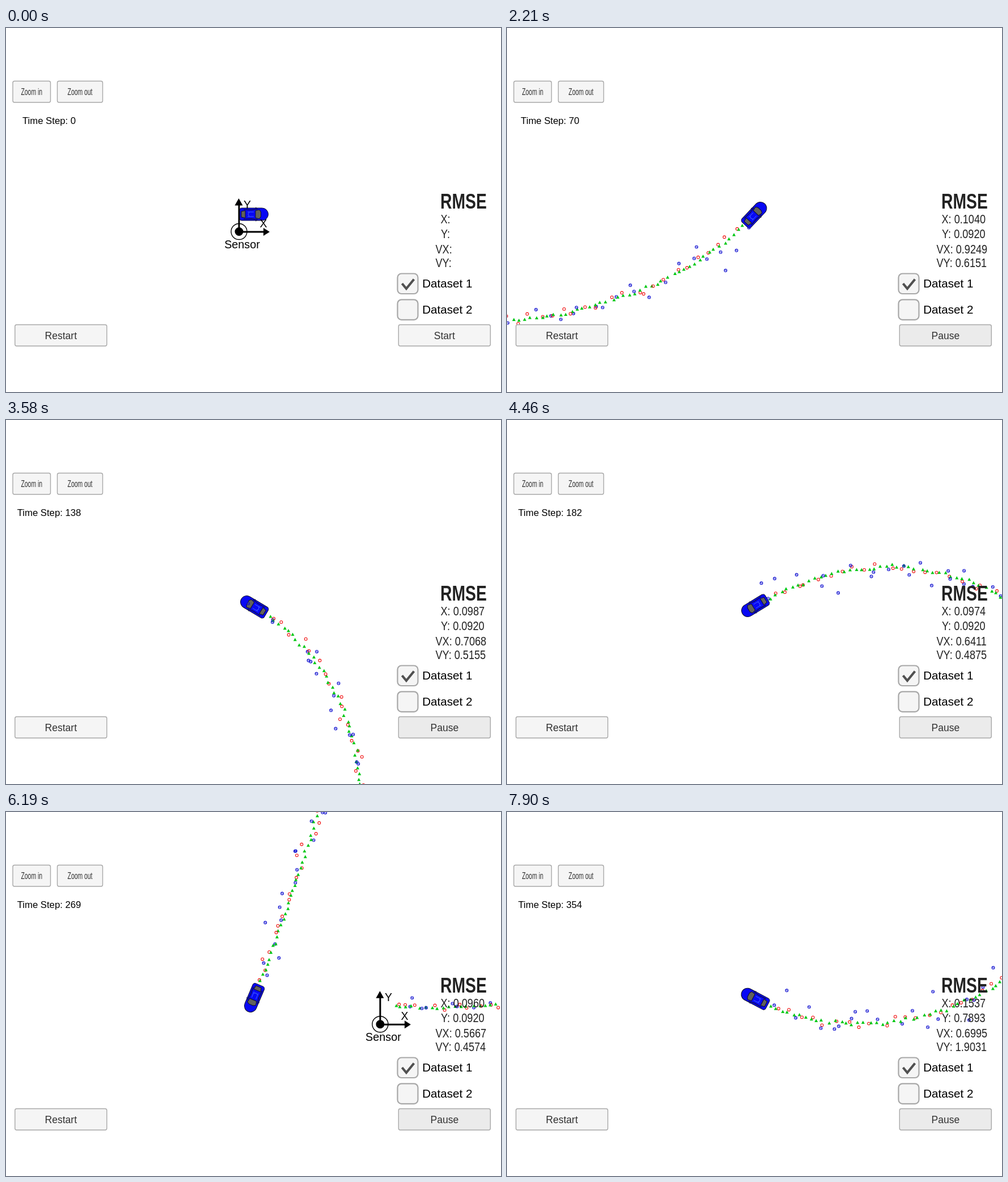
These frames come from a looping animation (873x641 px, 8 s). An HTML page with a canvas:

```html
<!DOCTYPE html>
<html lang="en">
<head>
<meta charset="utf-8">
<title>Tracking simulator</title>
<style>
  html, body { margin: 0; width: 100%; height: 100%; overflow: hidden; background: #fff; }
  canvas { display: block; }
</style>
</head>
<body>
<canvas id="stage" width="873" height="641"></canvas>
<script>
const ctx = document.getElementById('stage').getContext('2d');
const LOOP = 8000, TICK = 171.8, TICK_LEAD = 35, LAST_TICK = 46;
const SPEED = 10.6, LAST_STEP = 360, DIVERGE_STEP = 274;
const CAR = { x: 437, y: 328 };
const SENSOR = { x: -26, y: -30.5 };   // world units are pixels, y up, car starts at 0,0
const INK = '#323232', DARK_INK = '#222';

// Tick -> simulation step
const STEPS = [[4.84, 0], [21, 138], [32, 235], [41, 312], [46, 354]];

// Tick -> pointer tip: to the Start button, then down and away
const POINTER = [[1, 790, 585], [4, 768, 540], [8, 748.5, 594], [9, 748, 620]];

// Error = constant noise + a bad first guess + the later divergence
const ERRORS = [
  { name: 'X', x: 766.5, y: 344, noise: 0.093, start: 0.39, kick: 2.27 },
  { name: 'Y', x: 767, y: 369.5, noise: 0.092, start: 0, kick: 14.75 },
  { name: 'VX', x: 757.5, y: 396.5, noise: 0.365, start: 7.11, kick: 8.69 },
  { name: 'VY', x: 757.5, y: 421.3, noise: 0.387, start: 4, kick: 34.83 }
];

function lookup(rows, key) {
  let i = 1;
  while (i < rows.length - 1 && rows[i][0] < key) i++;
  const [a, b] = [rows[i - 1], rows[i]];
  const u = Math.min(1, Math.max(0, (key - a[0]) / (b[0] - a[0])));
  return a.slice(1).map((v, j) => v + (b[j + 1] - v) * u);
}

let seed = 7;
function random() {
  seed = (seed * 1664525 + 1013904223) % 4294967296;
  return (seed + 1) / 4294967297;
}
const gauss = sd => sd * Math.sqrt(-2 * Math.log(random())) * Math.cos(2 * Math.PI * random());

// The heading swings as a cosine, which makes the course a figure of eight.
const headingAt = step => 126 * Math.PI / 180 * (1 - Math.cos(2 * Math.PI * step / 494));

const path = [{ x: 0, y: 0 }];
for (let i = 0; i < LAST_STEP; i++) {
  const a = headingAt(i + 0.5), p = path[i];
  path.push({ x: p.x + SPEED * Math.cos(a), y: p.y + SPEED * Math.sin(a) });
}

// The filter diverges once and swings back to the true path.
function divergence(k) {
  if (k < 0) return { x: 0, y: 0 };
  return {
    x: k < 21 ? 18 * Math.cos(Math.PI * k / 14) : 0,
    y: -318 * Math.exp(-k / 7.5) * Math.cos(Math.PI * k / 24)
  };
}

function errorAt(step, { noise, start, kick }) {
  const k = step - DIVERGE_STEP + 1;
  const share = k > 0 ? 1 - Math.exp(-k / 3.5) : 0;
  return Math.sqrt(noise ** 2 + (start ** 2 + kick ** 2 * share) / step);
}

// Lidar has even noise; radar has range and bearing noise.
function measure(p, isLidar) {
  if (isLidar) return { x: p.x + gauss(5), y: p.y + gauss(5) };
  const dx = p.x - SENSOR.x, dy = p.y - SENSOR.y;
  const range = Math.hypot(dx, dy) + gauss(11), bearing = Math.atan2(dy, dx) + gauss(0.025);
  return { x: SENSOR.x + range * Math.cos(bearing), y: SENSOR.y + range * Math.sin(bearing) };
}

const marks = path.map((p, i) => {
  const off = divergence(i - DIVERGE_STEP), isLidar = i % 2 === 0;
  return {
    isLidar,
    reading: measure(p, isLidar),
    estimate: { x: p.x + off.x + gauss(1.7), y: p.y + off.y + gauss(1.7) }
  };
});

function text(str, x, y, size, { align = 'left', squeeze = 1, weight = '', color = INK } = {}) {
  ctx.save();
  ctx.translate(x, y);
  ctx.scale(squeeze, 1);
  ctx.font = `${weight} ${size}px "Liberation Sans", Arial, sans-serif`;
  ctx.textAlign = align;
  ctx.fillStyle = color;
  ctx.fillText(str, 0, 0);
  ctx.restore();
}

function polygon(points, fill, stroke, width = 1) {
  ctx.beginPath();
  points.forEach(([x, y]) => ctx.lineTo(x, y));
  ctx.closePath();
  ctx.fillStyle = fill;
  ctx.fill();
  if (stroke) { ctx.strokeStyle = stroke; ctx.lineWidth = width; ctx.stroke(); }
}

function line(points, color, width) {
  ctx.beginPath();
  points.forEach(([x, y]) => ctx.lineTo(x, y));
  ctx.strokeStyle = color;
  ctx.lineWidth = width;
  ctx.stroke();
}

function circle(x, y, r, stroke, width) {
  ctx.beginPath();
  ctx.arc(x, y, r, 0, 7);
  ctx.strokeStyle = stroke;
  ctx.lineWidth = width;
  ctx.stroke();
}

function box(x, y, w, h, radius, fill, border) {
  ctx.beginPath();
  ctx.roundRect(x, y, w, h, radius);
  ctx.fillStyle = fill;
  ctx.fill();
  ctx.strokeStyle = '#a8a8a8';
  ctx.lineWidth = border;
  ctx.stroke();
}

function button(label, x, y, w, size, squeeze, fill = '#f5f5f5') {
  box(x, y, w, 37.5, 3, fill, 1.4);
  text(label, x + w / 2, y + 19 + size * 0.36, size, { align: 'center', squeeze });
}

function checkbox(label, y, checked) {
  box(690.5, y, 36, 35.5, 7, '#f5f5f5', 2.2);
  if (checked) line([[698.5, 450], [706, 459], [719.5, 442.5]], '#505050', 4.2);
  text(label, 734.2, y + 24.5, 20.6, { color: '#000' });
}

function drawSensor({ x, y }) {
  line([[x, y], [x, y - 48]], '#000', 3);
  line([[x, y + 0.5], [x + 46, y + 0.5]], '#000', 3);
  polygon([[x - 7.5, y - 46], [x - 0.5, y - 58.5], [x + 6.5, y - 46]], '#000');
  polygon([[x + 43, y - 6.5], [x + 54, y + 0.5], [x + 43, y + 7.5]], '#000');
  circle(x, y, 3.75, '#000', 7.5);
  circle(x, y, 14, '#000', 1.4);
  const style = { align: 'center', color: '#000' };
  text('Y', x + 14.5, y - 41, 19.5, style);
  text('X', x + 43, y - 8, 19.5, style);
  text('Sensor', x + 5.5, y + 29.5, 19.8, style);
}

function drawCar(heading) {
  const dark = '#10102c', glass = '#62625c', crease = '#4060ff';
  ctx.save();
  ctx.translate(CAR.x, CAR.y);
  ctx.rotate(-heading);
  polygon([[3, -12.5], [5.5, -11], [5.5, 11], [3, 12.5]], dark);
  ctx.beginPath();
  ctx.roundRect(-25.5, -11, 51, 22, [5, 13, 13, 5]);
  ctx.fillStyle = '#0808f4';
  ctx.fill();
  ctx.strokeStyle = dark;
  ctx.lineWidth = 1;
  ctx.stroke();
  polygon([[-22, -5], [-15, -6.5], [-15, 6.5], [-22, 5]], glass, dark);
  polygon([[3, -6.5], [10, -8], [12.5, -4], [12.5, 4], [10, 8], [3, 6.5]], glass, dark);
  for (const side of [-1, 1]) {
    line([[-18, 8.5 * side], [-4, 7.8 * side], [7, 9.5 * side]], dark, 1.2);
    line([[-11, 4 * side], [0, 4 * side]], crease, 1);
  }
  line([[-8, -4], [-10, 0], [-8, 4]], crease, 1);
  ctx.restore();
}

function drawTrail(step, toScreen) {
  for (const { isLidar, reading, estimate } of marks.slice(0, Math.max(0, step - 2))) {
    const m = toScreen(reading), e = toScreen(estimate);
    circle(m.x, m.y, 2.4, isLidar ? '#f01010' : '#1010d0', 1.1);
    if (!isLidar) line([[m.x - 1.8, m.y - 0.8], [m.x + 1.8, m.y + 0.8]], '#1010d0', 0.9);
    polygon([[e.x - 3, e.y + 2.5], [e.x, e.y - 3], [e.x + 3, e.y + 2.5]], '#00c814');
  }
}

function drawPanel(step) {
  const running = step > 0;
  button('Zoom in', 12, 93.5, 66.5, 16, 0.65);
  button('Zoom out', 90.5, 93.5, 80, 16, 0.65);
  button('Restart', 15.8, 522.5, 162, 17.5, 1);
  button(running ? 'Pause' : 'Start', 692.3, 522.5, 162, 17.5, 1, running ? '#ebebeb' : '#f5f5f5');
  text(`Time Step: ${step}`, 76, 169, 16.7, { align: 'center', color: '#000' });

  text('RMSE', 766, 317.5, 37.5, { weight: 'bold', squeeze: 0.755, color: DARK_INK });
  for (const row of ERRORS) {
    const value = running ? ' ' + errorAt(step, row).toFixed(4) : '';
    text(`${row.name}:${value}`, row.x, row.y, 22.5, { squeeze: 0.805, color: DARK_INK });
  }

  checkbox('Dataset 1', 432.5, true);
  checkbox('Dataset 2', 478.3, false);
}

function drawPointer(tick) {
  if (tick < 1 || tick > 9) return;
  const [x, y] = lookup(POINTER, tick);
  const shape = [[0, 0], [0, 14], [3, 11.3], [5, 16.5], [7, 15.6], [5, 10.5], [8.8, 10.5]];
  polygon(shape.map(([dx, dy]) => [x + dx, y + dy]), '#fff', '#000', 1.1);
}

function draw(now) {
  const tick = Math.min(LAST_TICK, Math.floor((now % LOOP + TICK_LEAD) / TICK));
  const step = Math.round(lookup(STEPS, tick)[0]);
  const origin = path[step];
  const toScreen = p => ({ x: CAR.x + p.x - origin.x, y: CAR.y - p.y + origin.y });

  ctx.fillStyle = '#fff';
  ctx.fillRect(0, 0, 873, 641);
  drawCar(headingAt(step));
  drawSensor(toScreen(SENSOR));
  drawTrail(step, toScreen);
  drawPanel(step);
  drawPointer(tick);
}

const start = performance.now();
function animate() {
  draw(performance.now() - start);
  requestAnimationFrame(animate);
}
animate();
</script>
</body>
</html>
```
